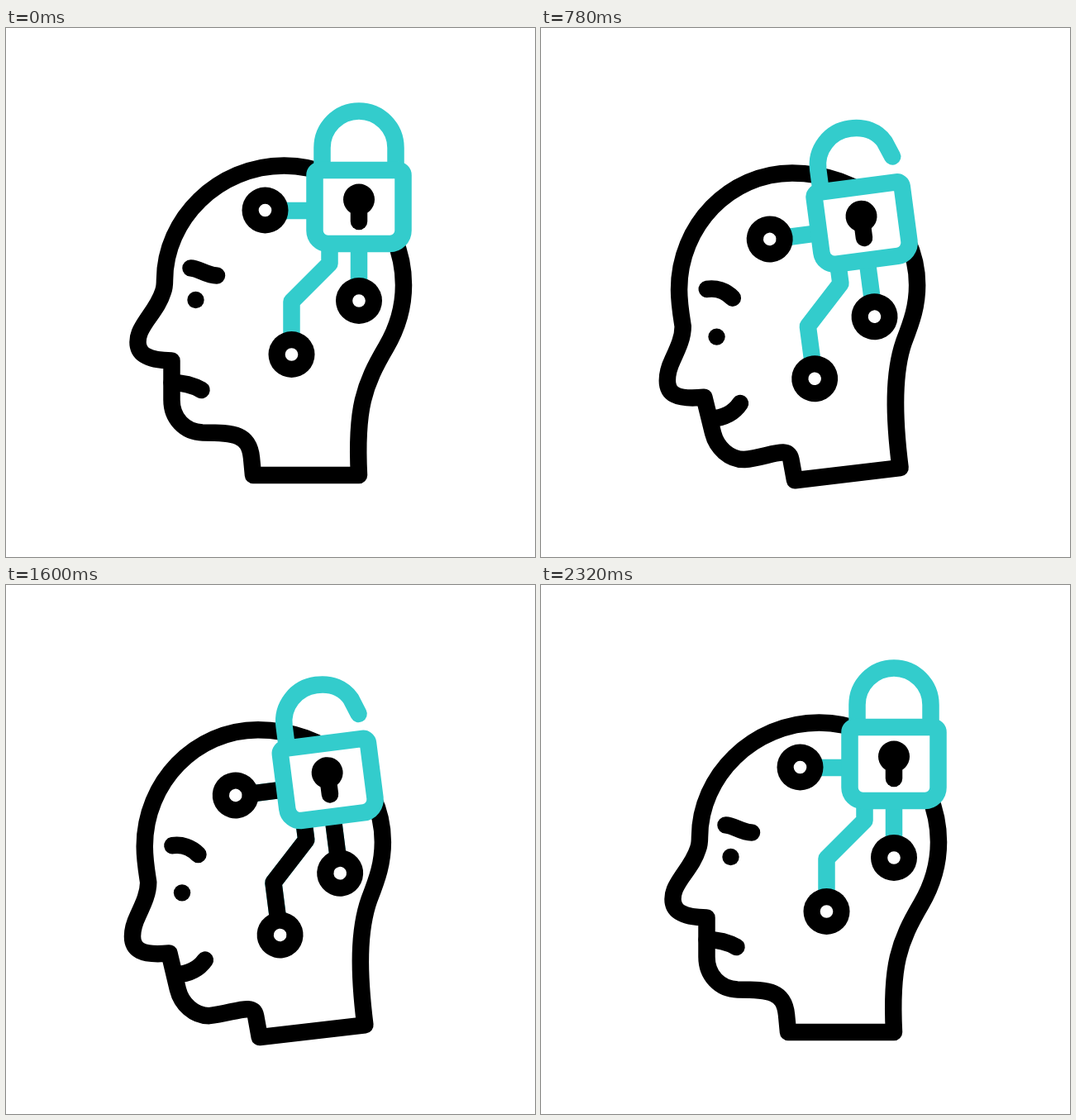
These frames come from a looping animation (640 by 640 pixels, 2400 ms). An HTML page with a canvas:

```html
<!DOCTYPE html>
<html lang="en">
<head>
<meta charset="utf-8">
<title>Mind lock</title>
<style>
  html, body { margin: 0; width: 100%; height: 100%; overflow: hidden; background: #fff; }
  canvas { display: block; width: 100vmin; height: 100vmin; }
</style>
</head>
<body>
<canvas id="stage" width="640" height="640"></canvas>
<script>
const ctx = document.getElementById('stage').getContext('2d');
const LOOP = 2400;
const BLACK = '#000', TEAL = '#33cccc', WHITE = '#fff';

// Each shape has a frowning and a smiling pose with the same commands.
const HEAD = [
  `M299 541 L427 541 C423 460 433 432 460 386 C474 362 481 335 481 311
   C481 231.2 416.3 166.5 336.5 166.5 C256.7 166.5 192 231.2 192 305
   C192 311 191.5 315 190 319 C186 332 179 341 170 354
   C162 366 159.5 372 159.5 380 C159.5 394 170 402 200.5 402.5
   L200.5 450 C200.5 472 216 489 238 489.5 C278 489.5 294 492 297 520 Z`,
  `M308 548 L435.5 531 C427 470 425 416 436.5 379 C446 353 452 336 452 311
   C452 231 380 176.5 300 176.5 C225 176.5 164 240 164 318
   C164 336 167 352 169.5 366 C170 380 164 393 158 407
   C153 418 152 425 152 432 C152 448 162 456 197 452
   L209 495 C214 512 229 526 247 526 C275 523 300 506 303 522 Z`
];
const BROW = ['M223.5 290.5 C233 290.5 242 299.5 255 299.5', 'M198 319 C209 317 221 320 229 330'];
const MOUTH = ['M200.5 429 C214 429 226 432 236.5 438', 'M206 478 C222 477 234 470 241.5 456'];
const SHACKLE = [
  'M382.5 172 L382.5 145 C382.5 120.4 402.4 100.5 427 100.5 C451.6 100.5 471.5 120.4 471.5 145 L471.5 172',
  'M382.5 172 L382.5 145 C382.5 120.4 402.4 100.5 427 100.5 C445 100.5 458 107 466 119 L474 137'
];

// Circuit wires run from the node towards the lock.
const WIRES = [
  { points: [[337.5, 221], [373, 221]], fill: 920, clear: 1745 },
  { points: [[345.5, 371], [345.5, 331], [391.5, 285], [391.5, 261]], fill: 1160, clear: 1945 },
  { points: [[427, 306], [427, 261]], fill: 1400, clear: 2120 }
];
const NODES = [[313.5, 220.5], [345.5, 395], [427, 330]];
const SPARKS = [
  [[492, 119.5], [510.5, 59.5]],
  [[520.5, 154.5], [574, 128.5]],
  [[536.5, 195.4], [587.5, 210.5]]
];

const lerp = (a, b, k) => a + (b - a) * k;

function ease(time, start, duration) {
  const u = Math.min(1, Math.max(0, (time - start) / duration));
  return u * u * (3 - 2 * u);
}

function morph([from, to], k) {
  const number = /[\d.]+/g;
  const target = to.match(number);
  let i = 0;
  return new Path2D(from.replace(number, n => lerp(+n, +target[i++], k)));
}

function stroke(path, color) {
  ctx.strokeStyle = color;
  ctx.stroke(path);
}

function disc(x, y, r, color) {
  ctx.fillStyle = color;
  ctx.beginPath();
  ctx.arc(x, y, r, 0, Math.PI * 2);
  ctx.fill();
}

function polyline(points) {
  const path = new Path2D();
  points.forEach(([x, y]) => path.lineTo(x, y));
  return path;
}

function polylineLength(points) {
  return points.slice(1).reduce((sum, [x, y], i) =>
    sum + Math.hypot(x - points[i][0], y - points[i][1]), 0);
}

function drawWire({ points, fill, clear }, time) {
  const path = polyline(points);
  ctx.lineCap = 'butt';
  stroke(path, TEAL);
  ctx.lineCap = 'round';
  const head = ease(time, fill, 240);
  const tail = ease(time, clear, 195);
  if (head <= tail) return;
  const length = polylineLength(points);
  ctx.setLineDash([(head - tail) * length, 1000]);
  ctx.lineDashOffset = -tail * length;
  stroke(path, BLACK);
  ctx.setLineDash([]);
}

function drawFace(k) {
  stroke(morph(HEAD, k), BLACK);
  stroke(morph(BROW, k), BLACK);
  stroke(morph(MOUTH, k), BLACK);
  disc(lerp(229.5, 210.5, k), lerp(329, 379, k), 10.2, BLACK);
}

function drawLock(k) {
  ctx.lineCap = 'round';
  stroke(morph(SHACKLE, k), TEAL);
  const body = new Path2D();
  body.roundRect(373.5, 172, 107, 89, [6, 6, 16, 16]);
  ctx.fillStyle = WHITE;
  ctx.fill(body);
  stroke(body, TEAL);
  disc(427, 207.5, 19, BLACK);
  stroke(polyline([[427, 207.5], [427, 234]]), BLACK);
}

function drawCircuit(time, k) {
  ctx.save();
  ctx.translate(lerp(378.25, 346.6, k), lerp(290.5, 319.5, k));
  ctx.rotate(-8.4 * k * Math.PI / 180);
  ctx.translate(-378.25, -290.5);
  WIRES.forEach(wire => drawWire(wire, time));
  NODES.forEach(([x, y]) => {
    disc(x, y, 28, BLACK);
    disc(x, y, 7.8, WHITE);
  });
  drawLock(k);
  ctx.restore();
}

function drawSparks(time) {
  if (time < 1700 || time >= 1995) return;
  const head = ease(time, 1700, 240);
  const tail = Math.min(ease(time, 1740, 245), head - 0.001);
  SPARKS.forEach(([a, b]) => {
    const at = k => [lerp(a[0], b[0], k), lerp(a[1], b[1], k)];
    stroke(polyline([at(tail), at(head)]), TEAL);
  });
}

function draw(time) {
  ctx.fillStyle = WHITE;
  ctx.fillRect(0, 0, 640, 640);
  ctx.lineWidth = 20.5;
  ctx.lineCap = ctx.lineJoin = 'round';
  const k = ease(time, 243, 676) - ease(time, 1450, 660);
  drawFace(k);
  drawCircuit(time, k);
  drawSparks(time);
}

const begin = performance.now();
function tick() {
  draw((performance.now() - begin) % LOOP);
  requestAnimationFrame(tick);
}
tick();
</script>
</body>
</html>
```
